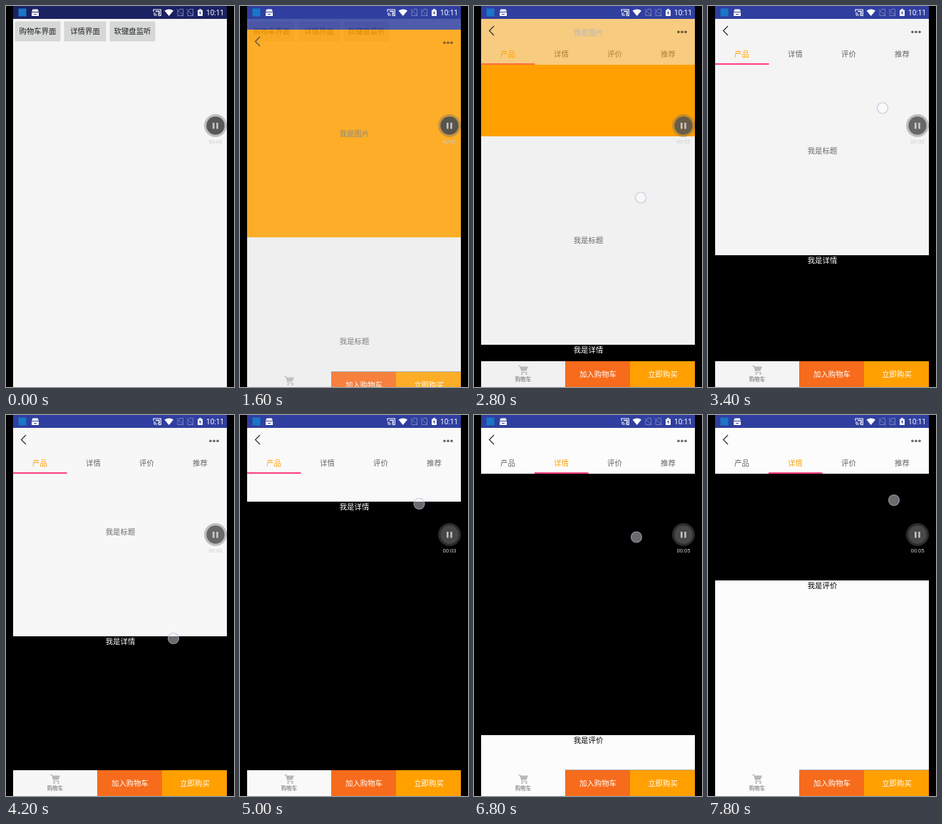
Animation of 320 by 532 pixels, one loop 8 s. Source, as an HTML page:

```html
<!DOCTYPE html>
<html lang="zh-CN">
<head>
<meta charset="utf-8">
<title>Product page scroll</title>
<style>
  html, body { margin: 0; width: 100%; height: 100%; overflow: hidden; background: #000; }
  svg { display: block; width: 100vw; height: 100vh; }
  text { font: 10.4px "Noto Sans CJK SC", "Noto Sans CJK", sans-serif; text-anchor: middle; }
  .small { font-size: 7.5px; }
  .clock { font: 10px Roboto, sans-serif; }
  .timer { font: 7.6px Roboto, sans-serif; }
  .paper { fill: var(--paper); }
</style>
</head>
<body>
<svg viewBox="0 0 320 532">
  <rect width="320" height="532"/>

  <!-- first screen -->
  <rect x="10" y="18" width="300" height="514" fill="#f5f5f5"/>
  <g fill="#d6d7d7" stroke="#c4c5c5" stroke-width=".5">
    <rect x="13" y="22" width="63" height="27" rx="1"/>
    <rect x="82" y="22" width="58" height="27" rx="1"/>
    <rect x="146" y="22" width="63" height="27" rx="1"/>
  </g>
  <g fill="#222">
    <text x="44.5" y="39.3">购物车界面</text>
    <text x="111" y="39.3">详情界面</text>
    <text x="177.5" y="39.3">软键盘监听</text>
  </g>

  <!-- product screen -->
  <g id="win">
    <g id="scroll">
      <rect x="10" y="18" width="300" height="290" fill="#ffa000"/>
      <text x="160.5" y="166.5" fill="#757575">我是图片</text>
      <rect class="paper" x="10" y="308" width="300" height="291"/>
      <text x="160.5" y="457" fill="#6a6a6a">我是标题</text>
      <rect x="10" y="599" width="300" height="582"/>
      <text x="160.5" y="610" fill="#fff">我是详情</text>
      <rect class="paper" x="10" y="1181" width="300" height="582"/>
      <text x="160.5" y="1192">我是评价</text>
    </g>
    <rect x="10" width="300" height="18" fill="#303f9f"/>
    <g id="head">
      <rect class="paper" x="10" y="18" width="300" height="64"/>
      <g id="tabs" fill="#666">
        <text x="47.5" y="71.2">产品</text>
        <text x="122.5" y="71.2">详情</text>
        <text x="197.5" y="71.2">评价</text>
        <text x="272.5" y="71.2">推荐</text>
      </g>
      <rect id="mark" x="10" y="80" width="75.5" height="2" fill="#ff4081"/>
    </g>
    <path d="M28 28L21.5 34.5L28 41" fill="none" stroke="#333" stroke-width="1.3"/>
    <g fill="#000" fill-opacity=".6">
      <circle cx="287" cy="36.2" r="1.8"/>
      <circle cx="292" cy="36.2" r="1.8"/>
      <circle cx="297" cy="36.2" r="1.8"/>
    </g>
    <rect class="paper" x="10" y="496" width="118" height="36"/>
    <rect x="128" y="495" width="182" height="1" fill-opacity=".3"/>
    <rect x="128" y="496" width="91" height="36" fill="#f76b1c"/>
    <rect x="219" y="496" width="91" height="36" fill="#ffa000"/>
    <g fill="#b8b8b8">
      <path d="M64.5 503.5H76L73.5 509.5H66.5Z"/>
      <path d="M62 502.5H64.5L67.5 511.5H75" fill="none" stroke="#b8b8b8" stroke-width="1.2"/>
      <circle cx="67.5" cy="513.8" r="1.3"/>
      <circle cx="73.5" cy="513.8" r="1.3"/>
    </g>
    <text class="small" x="69" y="524.3" fill="#666">购物车</text>
    <g fill="#fff">
      <text x="174" y="518.2">加入购物车</text>
      <text x="265" y="518.2">立即购买</text>
    </g>
  </g>

  <!-- status bar -->
  <rect id="bar" x="10" width="300" height="18"/>
  <rect x="17.5" y="3.5" width="11" height="11" fill="#1976c8"/>
  <g fill="#fff">
    <path d="M37.5 4.5H44.5L46 8H36ZM36 9H46V14H36Z"/>
    <path d="M39 11h4v1h-4z" fill="#303f9f"/>
    <path d="M222.5 6.5Q229 2.5 235 6.5L228.7 14Z"/>
    <rect x="269" y="5.5" width="7" height="8.5" rx=".7"/>
    <rect id="cap" x="271" y="4" width="3" height="1.5"/>
    <path d="M273 6.5L270.8 10H272.4L271.9 13L274.3 9.3H272.7Z" fill="#303f9f"/>
    <text class="clock" x="293.5" y="12.8">10:11</text>
  </g>
  <g fill="none" stroke="#fff" stroke-width="1.1">
    <path d="M207 8V5H217.3V13.5H213.5M207 9.7A4 4 0 0 1 211 13.7M207 11.7A2 2 0 0 1 209 13.7"/>
    <path d="M210 7.5H215V11.5H213" stroke-width="1.4"/>
  </g>
  <g fill="none" stroke="#7480bd">
    <path id="sim" d="M241 7L244 4.5H248.5V13.5H241ZM239.5 4.5L249.5 14"/>
    <use href="#sim" x="14"/>
  </g>

  <!-- recorder button -->
  <circle cx="294" cy="167" r="16" fill="#6e6e6e" fill-opacity=".4"/>
  <circle id="disc" cx="294" cy="167" r="12.7" fill="#505050"/>
  <path d="M290 163h2.6v8.5h-2.6zM295.2 163h2.6v8.5h-2.6z" fill="#fff" fill-opacity=".65"/>
  <text id="timer" class="timer" x="294" y="191.8" fill="#ccc">00:00</text>

  <circle id="dot" r="7.5" fill="#fff" fill-opacity=".42" stroke="#b4b4d8" stroke-opacity=".7" stroke-width="1.2"/>
</svg>

<script>
  const LOOP = 8000, STEP = 200;
  const el = id => document.getElementById(id);
  const set = (id, props) => {
    for (const k in props) el(id).setAttribute(k, props[k]);
  };
  const clamp = v => Math.min(1, Math.max(0, v));

  // Piecewise linear value through [time, value] pairs
  function track(keys, t) {
    let [t0, v0] = keys[0];
    for (const [t1, v1] of keys) {
      if (t < t1) return v0 + (v1 - v0) * clamp((t - t0) / (t1 - t0));
      t0 = t1;
      v0 = v1;
    }
    return v0;
  }

  const SCROLL = [
    [2200, 0], [2400, 30], [2600, 78], [2800, 126], [3000, 172], [3200, 214], [3400, 251], [3600, 272],
    [4000, 272], [4200, 290], [4400, 345], [4600, 405], [4800, 455], [5000, 478],
    [5400, 478], [5600, 500], [5800, 560], [6000, 620], [6200, 672], [6400, 708], [6600, 728], [6800, 734],
    [7200, 734], [7400, 781], [7600, 871], [7800, 950]
  ];
  const PAPER = [[1400, 238], [2800, 241], [3400, 244], [5000, 249], [6800, 252]];
  const SLIDE = [[1400, 34], [1600, 15], [1800, 3], [2000, 0]];
  const FADE = [[1399, 0], [1400, 0.3], [1600, 0.84], [1800, 1]];

  // Finger and page move together, so y + scroll stays at `sum`
  const DRAGS = [
    { from: 2200, to: 3600, sum: 393.5, x: 245, y: 143 },
    { from: 4000, to: 5000, sum: 602, x: 251.5, y: 124 },
    { from: 5400, to: 6800, sum: 904.5, x: 228, y: 170 },
    { from: 7200, to: 7800, sum: 1069, x: 261, y: 119 }
  ];

  function draw(t) {
    const s = track(SCROLL, t);
    const grey = Math.round(track(PAPER, t));
    document.body.style.setProperty('--paper', `rgb(${grey},${grey},${grey})`);

    set('win', { opacity: track(FADE, t), transform: `translate(0 ${track(SLIDE, t)})` });
    set('scroll', { transform: `translate(0 ${-s})` });
    set('head', { opacity: clamp(s / 236) });

    // the second tab takes over once the details reach the header
    const active = s >= 517 ? 1 : 0;
    [...el('tabs').children].forEach((tab, i) => {
      tab.setAttribute('fill', i === active ? '#ffa000' : '#666');
    });
    set('mark', { x: 10 + 75 * clamp((s - 517) / 80) });

    const k = clamp(t / 400);
    set('bar', { fill: `rgb(${27 + 21 * k},${34 + 29 * k},${98 + 61 * k})` });
    set('cap', { opacity: t < 1000 ? 0.7 : 1 });
    set('disc', { 'fill-opacity': track([[1600, 0.93], [2800, 0.79]], t) });
    el('timer').textContent = '00:0' + Math.floor(t / 1320);

    const drag = DRAGS.find(d => t >= d.from && t <= d.to);
    set('dot', { visibility: drag ? 'visible' : 'hidden' });
    if (drag) {
      const y = drag.sum - s;
      set('dot', { cx: drag.x - (y - drag.y) * 0.088, cy: y });
    }
  }

  const start = performance.now();
  function frame() {
    const t = (performance.now() - start) % LOOP;
    draw(Math.floor(t / STEP) * STEP);
    requestAnimationFrame(frame);
  }
  frame();
</script>
</body>
</html>
```
